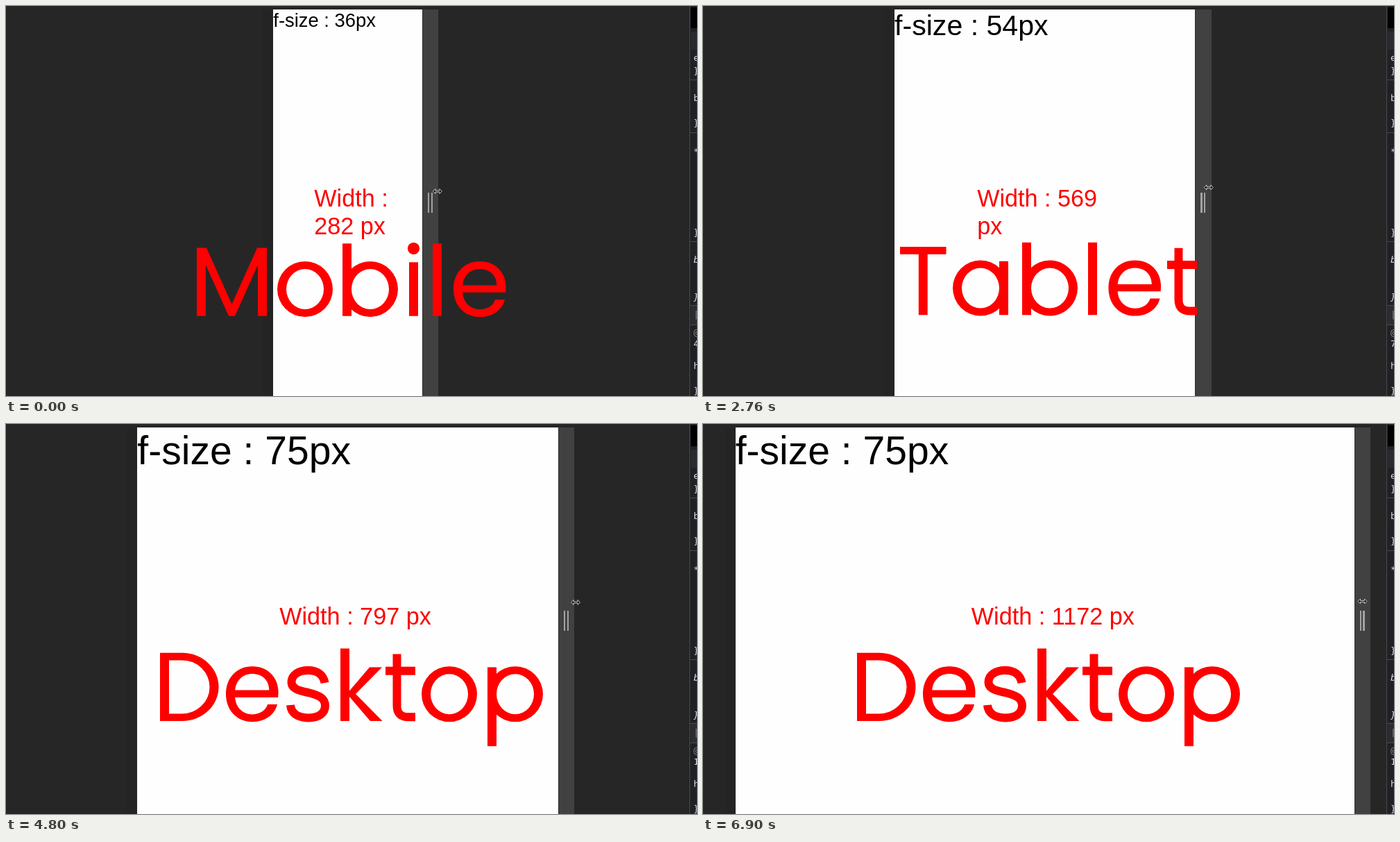
Write an HTML page that moves like this. It is 996 px wide and 562 px high and loops after 7260 ms.

```html
<!DOCTYPE html>
<html lang="en">
<head>
<meta charset="utf-8">
<title>Responsive width demo</title>
<style>
  html, body { margin: 0; width: 100%; height: 100%; overflow: hidden; background: #262626; }
  body { position: relative; font-family: "Liberation Sans", Arial, sans-serif; }
  body *, svg { position: absolute; }
  #page { top: 5px; bottom: 0; background: #fefefe; box-shadow: -15px 0 #242424; }
  #size { left: 0; top: 0; white-space: nowrap; color: #000; }
  #label { left: 50%; top: 251.5px; transform: translateX(-45%); font-size: 34.2px; line-height: 40px; color: #f00; }
  #gutter { left: 100%; top: 0; bottom: 0; width: 23.5px; background: #414141; box-shadow: inset 1px 0 #303030; }
  #gutter i { top: 264px; width: 2.5px; height: 29px; background: #a2a2a2; }
  #panel { left: 985px; top: 0; width: 11px; height: 562px; overflow: hidden; background: #202124; border-left: 1px solid #484848; box-sizing: border-box; }
  #panel hr { left: 0; width: 11px; height: 1px; margin: 0; border: 0; background: #4a4b4e; }
  #panel b { left: 1px; width: 10px; }
  #panel span { left: 5px; font: 13px/14px "DejaVu Sans Mono", monospace; color: #dde3ee; }
  #art { left: 0; top: 0; width: 996px; height: 562px; fill: #f00; }
  .line { fill: none; stroke: #f00; stroke-width: 12; }
</style>
</head>
<body>
<div id="page">
  <div id="size"></div>
  <div id="label"></div>
  <div id="gutter"><i style="left:8px"></i><i style="left:12.8px"></i></div>
</div>
<div id="panel">
  <b style="top:2px;height:30px;background:#000"></b>
  <b style="top:37px;height:26px;background:#2a2b2e"></b>
  <b style="top:432px;height:27px;background:#2c2d30"></b>
</div>
<svg id="art" viewBox="0 0 996 562">
  <defs>
    <path id="o" d="M0-38.8a40 40 0 0 1 80 0a40 40 0 0 1-80 0M13-38.8a27 29 0 0 0 54 0a27 29 0 0 0-54 0"/>
    <path id="l" d="M0 0V-104.5H13V0"/>
    <path id="x" d="M0 0V-77.5H13V0"/>
    <g id="a"><use href="#o"/><use href="#x" x="67"/></g>
    <g id="b"><use href="#o"/><use href="#l"/></g>
    <g id="p"><use href="#o"/><use href="#x"/><use href="#x" y="36.3"/></g>
    <g id="i"><use href="#x"/><circle cx="6.5" cy="-97.5" r="8.6"/></g>
    <path id="e" d="M75.2-34H13.2C14-19 25-9.6 38.3-9.6C49-9.6 57-15 60.1-23.9H74C70.6-9.5 57 1.3 38.3 1.3C16 1.3 0-15 0-38.9C0-63 16-78.8 38.3-78.8C60-78.8 75.6-63 75.6-41.7ZM62.3-44.4C62.3-59 52-67.9 37.8-67.9C25-67.9 14.5-59 13.3-44.4Z"/>
    <path id="t" class="line" d="M16.5-96.5V-22Q16.5-5.7 33-5.7H43M0-72.3H43"/>
    <path id="s" class="line" d="M56-55C54-67 45-73 32-73C18-73 8-66.5 8-56C8-47 17-44 32-41C48-37 56.5-33 56.5-22C56.5-11 47-4.6 32.5-4.6C17-4.6 7.5-11 6.5-23"/>
    <path id="k" d="M0-104.5H13V-43.5L42-77.5H60L22-39L60.5 0H43L13-35V0H0Z"/>
    <path id="M" d="M101 0H88V-73.5L55 0H46L13-73.5V0H0V-98.2H14L50.5-17L87-98.2H101Z"/>
    <path id="T" d="M0-98.2H66.5V-87.6H39.7V0H26.8V-87.6H0Z"/>
    <path id="D" d="M0-98.2H32A52.5 49.1 0 0 1 32 0H0ZM13-10.6H32A39.5 38.5 0 0 0 32-87.6H13Z"/>
  </defs>
  <g id="word"></g>
  <path id="cursor" d="M-6.5 0L-3-3.5V-1H3V-3.5L6.5 0L3 3.5V1H-3V3.5Z" fill="#111" stroke="#ddd" stroke-width=".9"/>
</svg>
<script>
const LOOP = 7260, SCALE = 0.761, CENTER = 492.6;
const $ = id => document.getElementById(id);

// time in ms, viewport width, pointer distance from the page edge
const keys = [
  [60, 282, 22], [560, 367, 19], [760, 367, 19], [1000, 404, 16], [1230, 404, 16],
  [1400, 430, 15], [1600, 430, 15], [2130, 488, 14], [2300, 510, 16], [3030, 603, 22],
  [3360, 666, 12], [3700, 693, 14], [3800, 693, 14], [4260, 750, 19], [4500, 770, 24],
  [5230, 836, 27], [5400, 884, 26], [5930, 966, 31], [6000, 966, 31], [6430, 1070, 22],
  [6700, 1134, 17], [6900, 1172, 12]
];

const devices = [
  { name: "Mobile", max: 480, size: 36, digit: "4", base: 446.8, xs: [275, 391, 485, 581, 615, 645] },
  { name: "Tablet", max: 768, size: 54, digit: "7", base: 445.3, xs: [284, 360, 460, 555, 584.5, 669] },
  { name: "Desktop", max: Infinity, size: 75, digit: "1", base: 428, xs: [222, 317, 403.5, 482, 547, 599, 694] }
];

const lines = [["e", 75], ["}", 94], ["b", 133], ["}", 169], ["*", 210], ["}", 327], ["b", 366, 1],
  ["}", 420, 1], ["|", 445], ["@", 471], ["4", 487], ["h", 519], ["}", 555]];
for (const y of [106, 182, 339, 431, 459])
  $("panel").insertAdjacentHTML("beforeend", `<hr style="top:${y}px">`);
const rows = lines.map(([text, y, italic]) => {
  const row = document.createElement("span");
  row.textContent = text;
  row.style.top = y - 7 + "px";
  if (italic) row.style.fontStyle = "italic";
  if (text === "@" || text === "|") row.style.color = "#888";
  return $("panel").appendChild(row);
});

function sample(t) {
  const next = keys.findIndex(k => k[0] > t);
  if (next < 0) return keys.at(-1).slice(1);
  if (next === 0) return keys[0].slice(1);
  const a = keys[next - 1], b = keys[next], u = (t - a[0]) / (b[0] - a[0]);
  return [1, 2].map(i => a[i] + (b[i] - a[i]) * u);
}

let shown;
function showDevice(device) {
  if (device === shown) return;
  shown = device;
  $("word").setAttribute("transform", `translate(0 ${device.base})`);
  $("word").setAttribute("aria-label", device.name);
  $("word").innerHTML = [...device.name].map((c, i) => `<use href="#${c}" x="${device.xs[i]}"/>`).join("");
  $("size").textContent = `f-size : ${device.size}px`;
  $("size").style.fontSize = device.size * SCALE + "px";
  rows[10].textContent = device.digit;
}

function draw(now) {
  const [rawWidth, lead] = sample(now % LOOP);
  const width = Math.round(rawWidth), half = width * SCALE / 2;
  $("page").style.left = CENTER - half + "px";
  $("page").style.width = half * 2 + "px";
  $("label").textContent = `Width : ${width} px`;
  showDevice(devices.find(d => width <= d.max));
  const y = Math.max(255.5, 267 - (width - 282) * 0.0195);
  $("cursor").setAttribute("transform", `translate(${CENTER + half + lead} ${y})`);
}

const start = performance.now();
function tick() {
  draw(performance.now() - start);
  requestAnimationFrame(tick);
}
tick();
</script>
</body>
</html>
```
